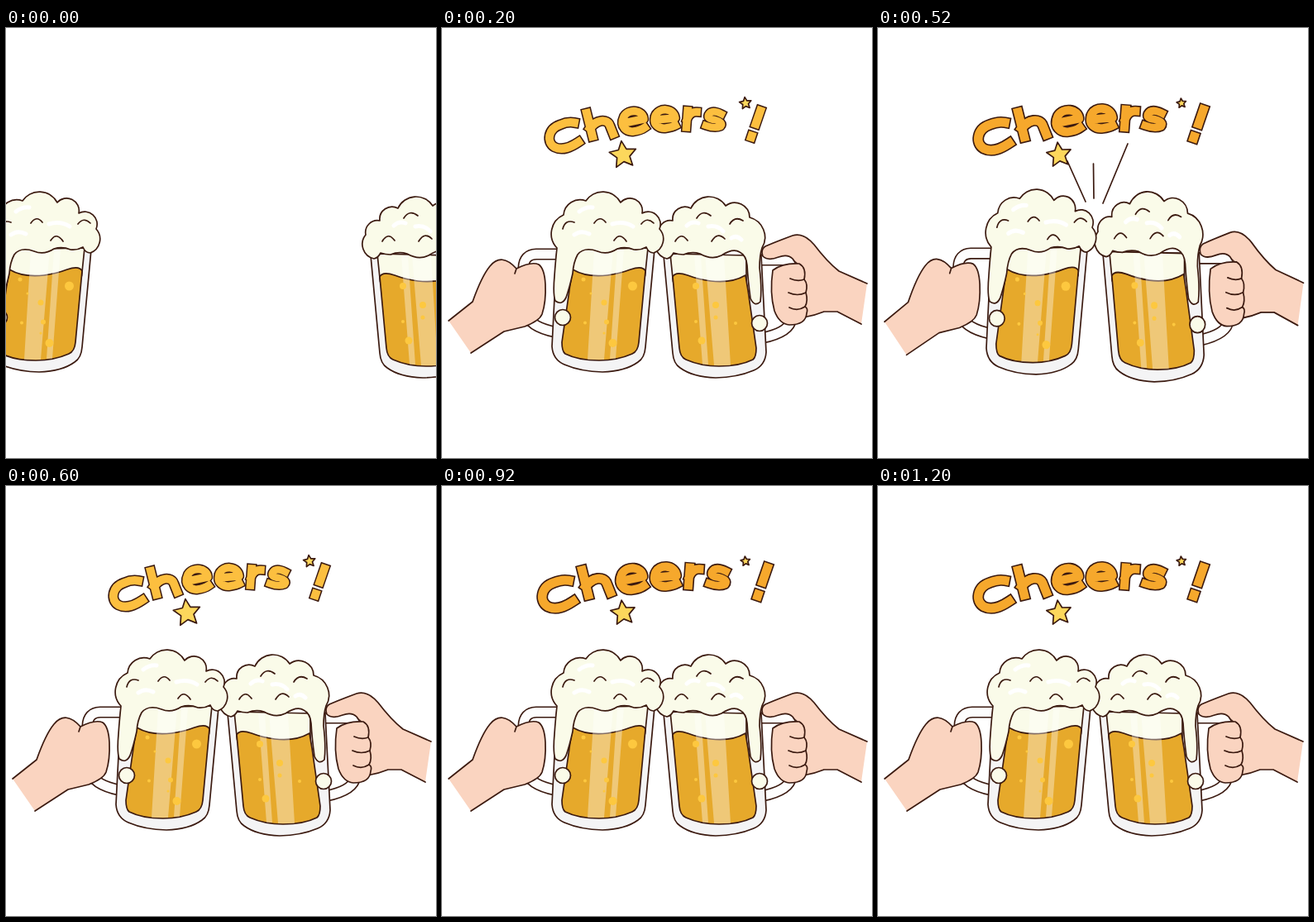
An HTML page for the animation above (1.4 s loop, 520x520 px).

```html
<!DOCTYPE html>
<html lang="en">
<head>
<meta charset="utf-8">
<title>Cheers !</title>
<style>
html, body { margin: 0; width: 100%; height: 100%; overflow: hidden; background: #fff }
svg { display: block; width: 100vw; height: 100vh }
.ink { stroke: #3b1a10; stroke-width: 1.7; stroke-linejoin: round; stroke-linecap: round; fill: none }
.skin { fill: #fad4c0 }
.foam { fill: #fafbe9 }
.beer { fill: #e6a92b }
.glass { fill: #f4f4f5 }
.star { fill: #fcd75c }
.shine { fill: none; stroke: #fff; stroke-width: 5; stroke-linecap: round }
.letter path { fill: none; stroke-linejoin: round; stroke-linecap: square }
</style>
</head>
<body>
<svg viewBox="0 0 520 520" role="img" aria-label="Cheers !">
  <defs>
    <g id="handle" fill="none">
      <path id="grip" d="M142 273.500H114Q99 274 98.500 290L103 346Q105 361 138 368" stroke="#3b1a10" stroke-width="14"/>
      <path d="M142 273.500H114Q99 274 98.500 290L103 346Q105 361 138 368" stroke="#fdfdfd" stroke-width="10.800"/>
    </g>
    <g id="cup">
      <path class="ink glass" d="M139 268L133 385Q134 401 148 407Q168 415.500 194 416Q222 415 237 404Q245 399 246 386L257 268Z"/>
      <path class="ink foam" d="M157 268L157 300H245.500L249 266Z"/>
      <path class="ink beer" d="M158 292Q175 302 200 299Q215 297 228 292Q243 287 246 294L238 380Q237 391 230 394Q212 402 190 402Q165 402 149 394Q145 391 145 380L155 310Z"/>
      <path fill="#fff" opacity=".36" d="M184 268H207L196 401H176ZM212 268H220L210 400H203Z"/>
    </g>
  </defs>

  <g id="right">
    <use href="#handle" transform="matrix(-1 0 0 1 525 7)"/>
    <path class="skin" d="M514 309L480 294Q466 283 450 262Q437 247 424 251Q405 258 391 264Q385 268 388 276Q394 282 407 277Q418 273 424 279L432 286L425 350H437Q450 348 462 343H478L507 358Z"/>
    <path class="ink" d="M514 309L480 294Q466 283 450 262Q437 247 424 251Q405 258 391 264Q385 268 388 276Q394 282 407 277Q418 273 424 279L428 285M437 350Q450 348 462 343H478L507 358"/>
    <path class="ink skin" d="M400 293Q396 320 402 342Q408 358 420 359Q440 359 441 345Q443 339 439 337Q443 330 440 320Q443 310 438 304Q441 290 432 285Q412 284 400 293Z"/>
    <path class="ink" d="M438 304Q430 307 421 303M440 320Q430 325 419 320M439 337Q430 343 420 338"/>
    <use href="#cup" transform="matrix(-1 0 0 1 525 7)"/>
    <g class="bubbles" data-at="307 312 4,331 335 4,331 350 2.500,307 355 2,314 378 4.500,355 357 2"></g>
    <path class="ink foam" d="M387 266A25 25 0 0 0 372 229A18 18 0 0 0 343 215A24 24 0 0 0 301 218A15 15 0 0 0 279 233A14.500 14.500 0 0 0 262 250A18 18 0 0 0 272 279Q277 278 280 272Q286 274 292 274Q302 270 312 273Q326 281 338 275Q352 266 360 271Q368 275 369 287Q370 305 373 327Q378 338 385 331Q387 315 384 290Q384 275 387 266Z"/>
    <path class="shine" d="M296 239Q302 233 310 236M322 240Q333 238 340 246M350 254Q356 250 362 256"/>
    <path class="ink" d="M282 258Q289 246 297 257M308 230Q315 219 325 227M326 258Q333 246 342 255M348 237Q354 227 364 233"/>
    <circle class="ink foam" cx="384" cy="357" r="9.500"/>
  </g>

  <g id="left">
    <use href="#handle"/>
    <path class="skin" d="M8 354L37 331Q48 300 58 288Q72 271 90 291Q108 282 117 286Q124 291 125 310Q126 331 121 346Q118 354 100 361L75 367L35 393Z"/>
    <path class="ink" d="M8 354L37 331Q48 300 58 288Q72 271 90 291Q108 282 117 286Q124 291 125 310Q126 331 121 346Q118 354 100 361L75 367L35 393M90 291L88 297"/>
    <use href="#cup"/>
    <g class="bubbles" data-at="230.500 312 5.500,171 304 2.500,196 332 3.500,180 321 1.500,199 355.500 3,173 356.500 2,196 369 1.500,206.500 381 5"></g>
    <path class="ink foam" d="M139 266A25 25 0 0 1 147 226A20 20 0 0 1 174 209A24.500 24.500 0 0 1 216 211A15 15 0 0 1 242 224A15 15 0 0 1 263 243A18 18 0 0 1 256 272Q250 272 247 265Q240 269 232 268Q222 264 212 267Q200 275 188 270Q172 264 164 274Q159 283 158 297Q154 315 150 326Q145 336 137 330Q134 322 136 300Q137 285 139 266Z"/>
    <path class="shine" d="M160 250Q168 244 178 249M166 222Q174 216 182 217M206 237Q220 233 231 240"/>
    <path class="ink" d="M146 243Q149 231 160 235M184 236Q191 226 198 235M241 237Q248 228 256 236M208 257Q215 246 223 258"/>
    <circle class="ink foam" cx="146" cy="350" r="9.500"/>
  </g>

  <path id="sparks" class="ink" d="M229 161L251 210M260.500 164L261 206M302 140L272 212"/>
  <g id="title">
    <g id="word"></g>
    <path id="bigStar" class="ink star"/>
    <path id="smallStar" class="ink star"/>
  </g>
</svg>
<script>
const $ = id => document.getElementById(id);

// Centre lines of the letters C h e e r s !, each with its stroke width
const letters = [
  ["M160 114.500Q152 113 143 117C128 122 126 138 136 144C146 149 156 144 165 138", 10],
  ["M175 103L182 131M179 121C186 111 200 109 203 118L207 128", 10],
  ["M220 115L244 110C243 99 226 97 220 107C214 120 224 126 232 125Q240 124 245 120.500", 9.5],
  ["M258 111L282 109C280 96 262 96 258 106C254 118 264 122 271 121Q278 120 282 118", 9.5],
  ["M297 100L295.500 120M296.500 110Q300 101 308 101.500", 9.5],
  ["M338 104Q326 98 322 105Q320 110 330 111Q341 114 337 119Q330 122 319 118", 8.5],
  ["M385 100L379.500 116M374.500 130.500L374 132", 10]
];
$("word").innerHTML = letters.map(([d, w]) =>
  `<g class="letter"><path d="${d}" stroke="#3b1a10" stroke-width="${w + 3}"/><path d="${d}" stroke="currentColor" stroke-width="${w}"/></g>`).join("");

for (const g of document.querySelectorAll(".bubbles"))
  g.innerHTML = g.dataset.at.split(",").map(b => {
    const [x, y, r] = b.split(" ");
    return `<circle cx="${x}" cy="${y}" r="${r}" fill="#fdc83f"/>`;
  }).join("");

function star(x, y, r) {
  let d = "";
  for (let i = 0; i < 10; i++) {
    const a = (i * 36 - 97) * Math.PI / 180, q = i % 2 ? r * 0.48 : r;
    d += (i ? "L" : "M") + (x + q * Math.cos(a)).toFixed(1) + " " + (y + q * Math.sin(a)).toFixed(1);
  }
  return d + "Z";
}

const still = "translate(0 0)";
const poses = {
  apart: ["translate(-154 0)", "translate(173 0)"],
  touch: [still, still],
  clink: ["matrix(.985 0 0 1.0275 0 -8.450)", "matrix(.986 0 0 1.05 7.700 -16.250)"]
};

function draw(t) {
  const step = Math.floor(t % 1400 / 200);
  const [l, r] = poses[step == 0 ? "apart" : step == 2 ? "clink" : "touch"];
  $("left").setAttribute("transform", l);
  $("right").setAttribute("transform", r);
  $("title").style.display = step ? "" : "none";
  $("sparks").style.display = step == 2 ? "" : "none";

  const big = step % 2 == 0;
  $("word").setAttribute("transform", big ? "translate(258 118) scale(1.067) translate(-258 -118)" : still);
  $("word").style.color = big ? "#f6a82c" : "#fcbf3f";
  $("bigStar").setAttribute("d", star(219, 153.5, big ? 15.5 : 17));
  $("smallStar").setAttribute("d", star(367, 91, big ? 6 : 7.5));
}

function loop(t) {
  draw(t);
  requestAnimationFrame(loop);
}
draw(0);
requestAnimationFrame(loop);
</script>
</body>
</html>
```
